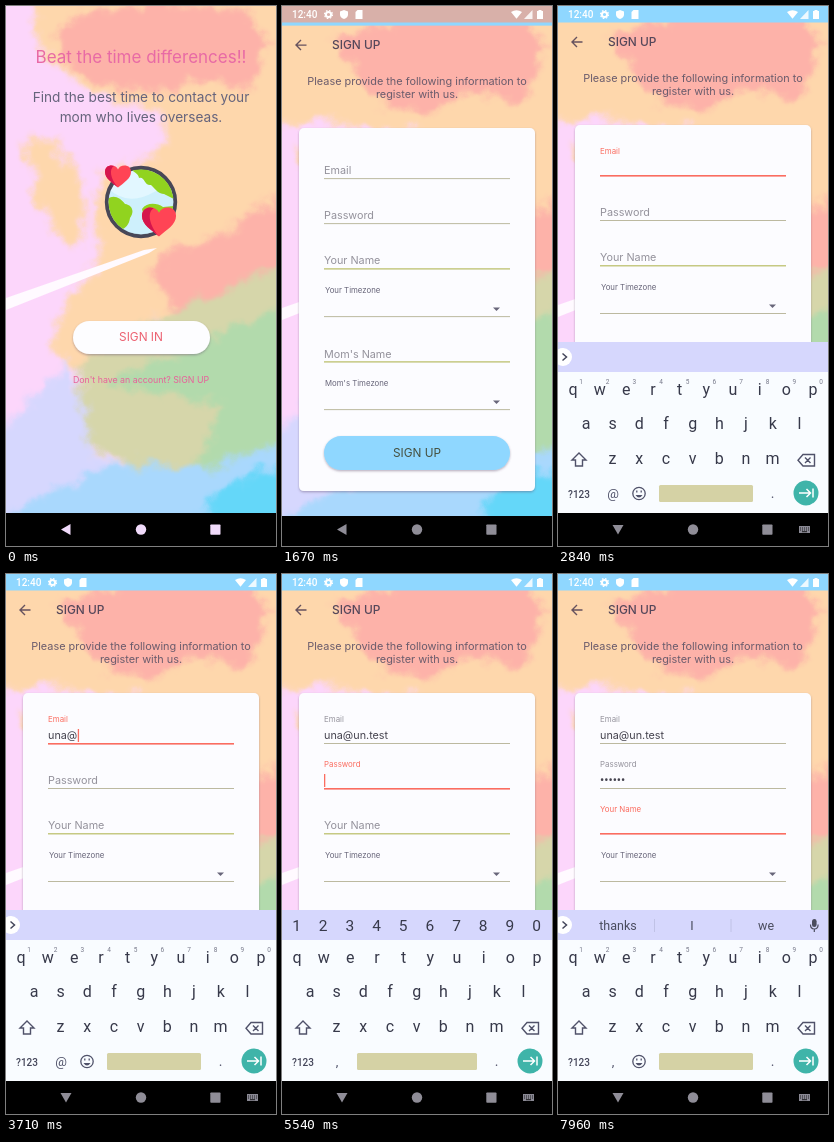
An HTML page that plays this animation: 270 by 540 pixels, repeating every 8000 ms.

```html
<!DOCTYPE html>
<html lang="en">
<head>
<meta charset="utf-8">
<title>Sign up flow</title>
<style>
  html, body { margin: 0; width: 100%; height: 100%; overflow: hidden; background: #000; }
  svg { display: block; width: 100vw; height: 100vh; }
  text { font-family: Inter, "Open Sans", sans-serif; dominant-baseline: alphabetic; }
  .roboto, .roboto text { font-family: Roboto, sans-serif; }
  .mid { text-anchor: middle; }
</style>
</head>
<body>
<svg id="stage" viewBox="0 0 270 540" preserveAspectRatio="none">
  <defs>
    <filter id="paint" filterUnits="userSpaceOnUse" x="-30" y="-30" width="330" height="600" color-interpolation-filters="sRGB">
      <feGaussianBlur stdDeviation="3.5" result="soft"/>
      <feTurbulence type="fractalNoise" baseFrequency=".05" numOctaves="3" seed="4" result="noise"/>
      <feDisplacementMap in="soft" in2="noise" scale="22" xChannelSelector="R" yChannelSelector="G"/>
    </filter>
    <filter id="shadow" x="-10%" y="-10%" width="120%" height="130%">
      <feDropShadow dx="0" dy="1.2" stdDeviation="1" flood-color="#605070" flood-opacity=".45"/>
    </filter>
    <clipPath id="ocean"><circle cx="135" cy="196" r="32.5"/></clipPath>
    <path id="heart" d="M0 11C-6 6-13 2-13-4.500C-13-9-10-11-6.500-11C-3.500-11-1-9.500 0-7C1-9.500 3.500-11 6.500-11C10-11 13-9 13-4.500C13 2 6 6 0 11Z"/>
    <path id="heartShade" d="M0 11C-6 6-13 2-13-4.500C-13-9-10-11-6.500-11L-4-10.500C-9-8-8 2 0 11Z"/>
    <g id="washes">
      <rect x="-60" y="-60" width="400" height="680" fill="#fcd6fb"/>
      <path fill="#fed7ac" d="M22-60H340V290L150 310L80 365L42 347L60 300L82 268L95 240L88 215L95 170L148 150L163 130L152 106L108 96L75 80L40 52L28 20Z"/>
      <path fill="#fed7ac" d="M18 135L50 134L80 190L78 235L55 236L30 190Z"/>
      <path fill="#fdb2a9" d="M48 28L75 8L160-4L240 5L262 40L245 82L190 74L150 86L105 82L62 62Z"/>
      <path fill="#fdb2a9" d="M145 262L165 244L215 230L245 205L340 165V260L175 306L152 285Z"/>
      <path fill="#d6d6aa" d="M74 358L120 325L176 302L340 232V480L150 468L78 440Z"/>
      <path fill="#b2daac" d="M100 378L160 350L340 275V480L190 462L215 400Z"/>
      <path fill="#d6d7fe" d="M-60 470L20 400L62 355L78 400L84 445L140 470L90 620H-60Z"/>
      <path fill="#a9d8fd" d="M-60 535L55 482L110 458L200 462L340 415V620H-60Z"/>
      <path fill="#64d7f9" d="M150 620L205 492L250 466L340 435V620Z"/>
    </g>
    <path id="trail" d="M0 292L138 244L151 242L143 247L0 304Z" fill="#fffaff"/>
  </defs>

  <g id="welcome">
    <use href="#washes" filter="url(#paint)"/>
    <use href="#trail"/>
    <g class="mid">
      <text id="title" x="135" y="57" font-size="17">Beat the time differences!!</text>
      <g font-size="13.65" fill="#66647c">
        <text x="135" y="95.500">Find the best time to contact your</text>
        <text x="135" y="115.500">mom who lives overseas.</text>
      </g>
    </g>
    <circle cx="135" cy="196" r="34.2" fill="#e2f7ff" stroke="#484757" stroke-width="4"/>
    <g clip-path="url(#ocean)">
      <path fill="#c2edfb" d="M100 180Q120 202 148 186T172 202V235H100Z" opacity=".6"/>
      <path fill="#91d31f" d="M102 193C107 188 115 192 119 198C126 199 129 205 124 212C123 220 117 226 110 222L100 208ZM120 160C126 166 132 166 133 172C139 170 138 180 145 179C150 184 153 188 158 188L170 194V166L150 156ZM136 203C141 196 151 197 157 201L168 200V222L151 228L140 219Z"/>
    </g>
    <g id="hearts"></g>
    <rect x="67" y="315" width="137" height="33" rx="16.500" fill="#fdfdff" filter="url(#shadow)"/>
    <text id="signIn" class="mid" x="135" y="335.300" font-size="11.8">SIGN IN</text>
    <text class="mid" x="135" y="377.200" font-size="8.8" fill="#e8609a">Don't have an account? SIGN UP</text>
  </g>

  <g id="signup">
    <g filter="url(#paint)">
      <use href="#washes"/>
      <path fill="#fed7ac" d="M-60-60H60L170 85V130L40 112L-60 120Z"/>
      <path fill="#fdb2a9" d="M50 30L110 14L225 20L262 50L240 92L180 84L140 108L95 92Z"/>
    </g>
    <use href="#trail" y="7"/>
    <rect width="270" height="16.500" fill="#8fd7ff"/>
    <path d="M24.500 36H14.500M19 31L14 36L19 41" fill="none" stroke="#66525e" stroke-width="1.400"/>
    <text x="50" y="39.600" font-size="11.9" font-weight="500" fill="#55475a">SIGN UP</text>
    <g class="mid" font-size="10.9" fill="#6b5c6c">
      <text x="135" y="75.500">Please provide the following information to</text>
      <text x="135" y="88.500">register with us.</text>
    </g>
    <rect x="17" y="119" width="236" height="363" rx="5" fill="#fcfcff" filter="url(#shadow)"/>
    <g id="form"></g>
    <rect x="42" y="427" width="186" height="34" rx="17" fill="#8fd7ff" filter="url(#shadow)"/>
    <text class="mid" x="135" y="448" font-size="11.8" fill="#45503f">SIGN UP</text>
  </g>

  <g id="status" class="roboto">
    <rect id="statusTint" width="270" height="16.500" fill="#d8b0a9"/>
    <g fill="#fff">
      <text x="10" y="11.800" font-size="10" font-weight="500">12:40</text>
      <circle cx="46.500" cy="8.500" r="2.600" fill="none" stroke="#fff" stroke-width="2"/>
      <circle cx="46.500" cy="8.500" r="4" fill="none" stroke="#fff" stroke-width="1.200" stroke-dasharray="1.600 1.540"/>
      <path d="M62 4L66 5.500V8.500Q66 11.500 62 13Q58 11.500 58 8.500V5.500Z"/>
      <path d="M75.500 4H80.500V13H73.500V6Z"/>
      <path d="M229 6Q234.500 2.500 240 6L234.500 12.800Z"/>
      <path d="M250.500 4V13H242Z" opacity=".85"/>
      <path d="M255 5H256.500V4H259.500V5H261V13H255Z"/>
    </g>
  </g>

  <g id="keyboard" class="roboto">
    <rect y="336" width="270" height="30.500" fill="#d6d7fd"/>
    <rect y="366" width="270" height="150" fill="#f9fcff"/>
    <g id="letters" class="mid" fill="#37394a" font-size="16"></g>
    <g id="hints" class="mid" fill="#77798a" font-size="6.500"></g>
    <g id="digits" class="mid" fill="#37394a" font-size="15.500"></g>
    <g id="chevron">
      <circle cx="5" cy="351" r="9" fill="#fff"/>
      <path d="M4.500 347.500L8.500 351L4.500 354.500" fill="none" stroke="#44465a" stroke-width="1.500"/>
    </g>
    <g id="suggestions" fill="#4a4c5e">
      <g class="mid" font-size="12.5">
        <text x="60" y="355.500">thanks</text><text x="134" y="355.500">I</text><text x="208" y="355.500">we</text>
      </g>
      <path d="M96.500 345V358M173 345V358" stroke="#c0c2e6"/>
      <rect x="254" y="345" width="4.600" height="8" rx="2.300"/>
      <path d="M252.500 350.500Q252.500 355 256.300 355T260.100 350.500M256.300 355V358" fill="none" stroke="#4a4c5e" stroke-width="1.200"/>
    </g>
    <g fill="none" stroke="#50526a" stroke-width="1.400">
      <path d="M21 447L28 454H24.500V460H17.500V454H14Z"/>
      <path d="M245 448.500H256.500V460H245L240 454.200ZM247 451.500L252.500 457M252.500 451.500L247 457"/>
    </g>
    <text class="mid" x="21" y="491.500" font-size="10" font-weight="500" fill="#44465a">?123</text>
    <text id="extraKey" class="mid" x="55" y="492" font-size="13" fill="#50526a"></text>
    <g id="emoji" fill="none" stroke="#50526a" stroke-width="1.300">
      <circle cx="81" cy="487.500" r="6.200"/>
      <path d="M77.500 489Q81 494 84.500 489Z" fill="#50526a" stroke="none"/>
      <path d="M78.800 484.500V486.500M83.200 484.500V486.500"/>
    </g>
    <rect id="space" y="479" height="17" rx="1.500" fill="#d5d2a5"/>
    <text class="mid" x="214.500" y="492" font-size="14" fill="#50526a">.</text>
    <circle cx="248" cy="487" r="12.500" fill="#3fb4a9"/>
    <path d="M241 487H252M248.500 483L252.500 487L248.500 491M255 482.500V491.500" fill="none" stroke="#fff" stroke-width="1.500"/>
  </g>

  <g id="nav">
    <rect id="navBar" width="270" height="40"/>
    <g id="navIcons">
      <path id="back" d="M55 523.500L64.500 518V529Z"/>
      <circle cx="135" cy="523.500" r="5.200"/>
      <rect x="204.300" y="518.500" width="10.200" height="10.200" rx=".8"/>
    </g>
    <g id="imeIcon">
      <rect x="241" y="520" width="11" height="7" fill="#8a8994"/>
      <path d="M242 522H251M242 524H251" stroke="#000" stroke-width=".8" stroke-dasharray="1 1"/>
      <path d="M244 525.700H249" stroke="#000" stroke-width=".8"/>
    </g>
  </g>
</svg>

<script>
const LOOP = 8000;
const OPEN = 1380, FOCUS = [2320, 5250, 7420];
const EMAIL = "una@un.test";
const RED = "#fb6d60", GREY = "#94929c";
const LINE = { fill: "#bcb9a0", height: 1 }, OLIVE_LINE = { fill: "#c6c983", height: 1.5 };
const $ = id => document.getElementById(id);
const clamp = x => Math.min(1, Math.max(0, x));
const phase = (t, start, length) => clamp((t - start) / length);
const easeOut = p => 1 - (1 - p) ** 2;
const lerp = (a, b, p) => a + (b - a) * p;
const mix = (a, b, p) => `rgb(${a.map((v, i) => Math.round(lerp(v, b[i], p)))})`;
const show = (id, on) => $(id).setAttribute("display", on ? "inline" : "none");

function add(parent, tag, attrs, text = "") {
  const node = document.createElementNS("http://www.w3.org/2000/svg", tag);
  set(node, attrs);
  node.textContent = text;
  parent.append(node);
  return node;
}
function set(node, attrs) {
  for (const key in attrs) node.setAttribute(key, attrs[key]);
}

for (const place of ["translate(112 170.500)", "translate(153 216) scale(1.310)"]) {
  const g = add($("hearts"), "g", { transform: place });
  add(g, "use", { href: "#heart", fill: "#ff4455" });
  add(g, "use", { href: "#heartShade", fill: "#d5154d" });
}

// Keyboard rows: characters, first key centre, baseline
const KEY = 26.67;
[["qwertyuiop", 15, 389], ["asdfghjkl", 28, 423], ["zxcvbnm", 54.5, 458]].forEach(([row, x, y]) =>
  [...row].forEach((c, i) => add($("letters"), "text", { x: x + i * KEY, y }, c)));
[..."1234567890"].forEach((c, i) => {
  add($("hints"), "text", { x: 23 + i * KEY, y: 378 }, c);
  add($("digits"), "text", { x: 14.5 + i * KEY, y: 357 }, c);
});

const form = $("form");
const underline = (y, style = LINE) => add(form, "rect", { x: 42, y, width: 186, ...style });

const fields = ["Email", "Password", "Your Name"].map((name, i) => {
  const y = 161 + 45 * i;
  return {
    y, line: underline(y + 8),
    label: add(form, "text", { x: 42 }, name),
    value: add(form, "text", { x: 42, y: y + 4, fill: "#45434f", "font-size": i === 1 ? 12.5 : 10.8, class: i === 1 ? "roboto" : "" }),
    caret: add(form, "rect", { y: y - 6, width: 1.3, height: 13, fill: RED }),
  };
});
add(form, "text", { x: 42, y: 348.5, "font-size": 10.8, fill: GREY }, "Mom's Name");
underline(352, OLIVE_LINE);
[["Your Timezone", 281], ["Mom's Timezone", 374]].forEach(([name, y]) => {
  add(form, "text", { x: 43, y: y + 2.8, "font-size": 7.8, fill: "#68667a" }, name);
  add(form, "path", { d: `M211 ${y + 17.5}h7l-3.500 3.500z`, fill: "#68667a" });
  underline(y + 26);
});

// Typing schedule: first key time, interval, number of keys
const typing = [[3150, 165, EMAIL.length], [5600, 250, 6], [LOOP, 1, 0]];

function typed(index, t) {
  const [start, step, count] = typing[index];
  return t < start ? 0 : Math.min(count, Math.floor((t - start) / step) + 1);
}

function drawField(index, t) {
  const { y, line, label, value, caret } = fields[index];
  const start = FOCUS[index], end = FOCUS[index + 1] ?? Infinity;
  const focused = t >= start && t < end;
  const p = easeOut(phase(t, start, 180));
  const size = lerp(10.8, 7.9, p);
  set(label, { y: y - 16 * p + size * 0.36, "font-size": size, fill: focused ? RED : GREY });
  set(line, focused ? { height: 1.6, fill: RED } : index === 2 ? OLIVE_LINE : LINE);

  const n = typed(index, t);
  const [first, step] = typing[index];
  const lastKey = n ? first + (n - 1) * step : start;
  const masked = t - lastKey > 450 || n === 0;
  const content = index === 0 ? EMAIL.slice(0, n)
    : masked ? "•".repeat(n) : "•".repeat(n - 1) + "1";
  if (value.textContent !== content) value.textContent = content;
  const blinkOn = Math.floor((t - lastKey) / 500) % 2 === 0;
  set(caret, {
    x: 42 + (content ? value.getComputedTextLength() + 0.5 : 0),
    display: focused && blinkOn ? "inline" : "none",
  });
}

function draw(t) {
  const settle = phase(t, 0, 400);
  $("title").setAttribute("fill", mix([232, 106, 165], [255, 91, 74], settle));
  $("signIn").setAttribute("fill", mix([236, 96, 112], [255, 91, 66], settle));

  const opened = t >= OPEN;
  const slide = 42 * (1 - phase(t, OPEN, 400)) ** 2;
  show("welcome", t < OPEN + 400);
  show("signup", opened);
  show("status", opened);
  set($("signup"), { transform: `translate(0 ${slide})`, opacity: phase(t, OPEN, 150) });
  set($("status"), { opacity: phase(t, OPEN, 150) });
  set($("statusTint"), { opacity: 1 - phase(t, 1760, 160) });
  fields.forEach((_, i) => drawField(i, t));

  const rise = easeOut(phase(t, 2420, 230));
  const password = t >= FOCUS[1] && t < FOCUS[2];
  const naming = t >= FOCUS[2];
  show("keyboard", rise > 0);
  $("keyboard").setAttribute("transform", `translate(0 ${171 * (1 - rise)})`);
  show("digits", password);
  show("hints", !password);
  show("chevron", !password);
  show("emoji", !password);
  show("suggestions", t >= FOCUS[2] + 120);
  $("extraKey").textContent = password || naming ? "," : "@";
  set($("space"), password ? { x: 75, width: 120 } : { x: 101, width: 94 });

  set($("navBar"), { y: 507 + (opened ? Math.min(3, slide) : 0) });
  set($("navIcons"), { fill: mix([240, 218, 250], [143, 141, 151], settle) });
  set($("back"), { transform: rise > 0 ? "rotate(-90 60 523.500)" : "" });
  show("imeIcon", rise > 0);
}

function tick(now) {
  draw(now % LOOP);
  requestAnimationFrame(tick);
}
draw(0);
requestAnimationFrame(tick);
</script>
</body>
</html>
```
